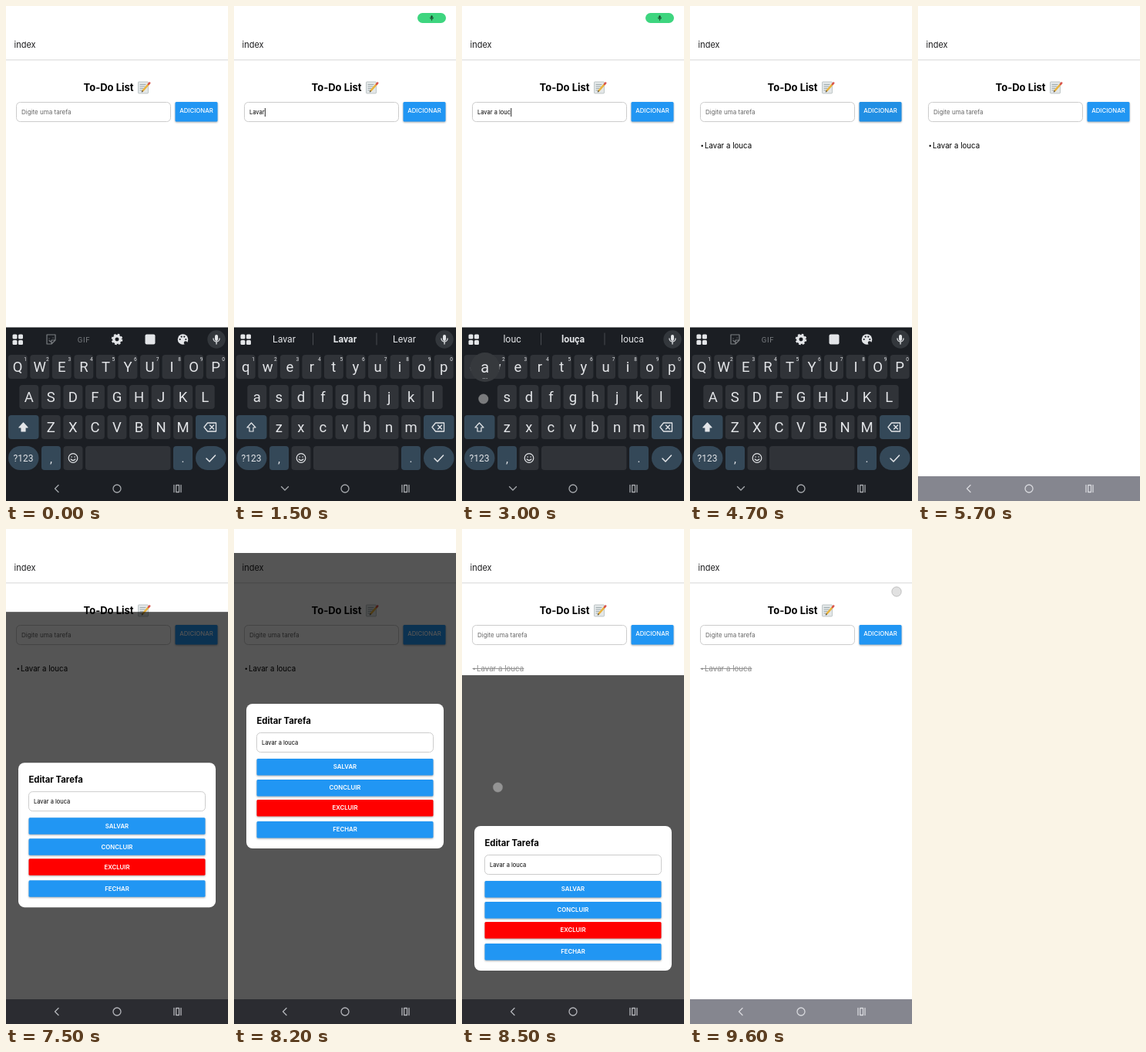
An HTML page that plays this animation: 288x640 px, repeating every 9.7 s.

```html
<!DOCTYPE html>
<html lang="pt">
<head>
<meta charset="utf-8">
<title>To-Do List</title>
<style>
  html, body { margin: 0; width: 100%; height: 100%; overflow: hidden; background: #fff; }
  svg { display: block; width: 288px; height: 640px; font-family: Inter, "Open Sans", sans-serif; }
  .kb { font-family: Roboto, "Noto Sans", sans-serif; fill: #e3e5e8; }
  .mid { text-anchor: middle; }
  .line { fill: none; stroke-linecap: round; stroke-linejoin: round; }
  .raised { filter: drop-shadow(0 1px 1px #0005); }
</style>
</head>
<body>
<svg id="stage" viewBox="0 0 288 640"></svg>
<script>
const LOOP = 9700, TASK = 'Lavar a louca';
const TYPE_START = 480, TYPE_STEP = 210, PRESS = 100;
const ADDED = 4450, HIDE_KEYS = 5450, OPEN = 7310, CLOSE = 8344, SLIDE = 300;
const BLUE = '#2196f3', KEY = '#303338', ACCENT = '#344858', BOARD = '#1b1e23', ICON = '#e3e5e8';

const rect = (x, y, w, h, r, fill, more = '') =>
  `<rect x="${x}" y="${y}" width="${w}" height="${h}" rx="${r}" fill="${fill}" ${more}/>`;
const circle = (x, y, r, more = '') => `<circle cx="${x}" cy="${y}" r="${r}" ${more}/>`;
const path = (d, stroke, width = 1.3, more = '') =>
  `<path class="line" d="${d}" stroke="${stroke}" stroke-width="${width}" ${more}/>`;
const text = (x, y, size, str, more = '') =>
  `<text x="${x}" y="${y}" font-size="${size}" ${more}>${str}</text>`;
const group = (id, body, more = '') => `<g id="${id}" ${more}>${body}</g>`;
const field = (x, y, w) => rect(x, y, w, 25, 5, '#fff', 'stroke="#ccc"');
const mic = (x, y, s, c) => `<g transform="translate(${x} ${y}) scale(${s})">` +
  rect(-2, -6, 4, 8, 2, c) + path('M-4 -1a4 4 0 0 0 8 0M0 3v3', c) + '</g>';

// Notepad with a pencil
const memo = rect(171.5, 98, 13, 15, 1, '#e3e7e8', 'stroke="#a9b3b5" stroke-width=".7"') +
  path('M174 101.5h7M174 104h6M174 106.5h4M174 109h3', '#8d9b9f', .8) +
  path('M177.5 109.5L185 101', '#e8b23c', 2.6) + path('M185 101l1.2-1.4', '#d9544d', 2.6) +
  path('M176.4 110.8l.8-.9', '#444', 1.2);

const page =
  rect(0, 0, 288, 640, 0, '#fff') +
  rect(0, 69, 288, 1, 0, '#e2e2e2') + rect(0, 70, 288, 1, 0, '#f3f3f3') +
  text(10.5, 54, 11, 'index', 'fill="#1c1c1e"') +
  text(100.5, 109.7, 13, 'To-Do List', 'font-weight="700"') + memo +
  field(13.5, 124.5, 200) +
  text(20, 140, 8, 'Digite uma tarefa', 'id="hint" fill="#666"') +
  text(20, 140, 7.5, '', 'id="typed"') +
  rect(63, 132, .9, 11, 0, '#111', 'id="caret"') +
  rect(219.5, 124, 55, 25.5, 1.5, BLUE, 'id="add" class="raised"') +
  text(247, 138.3, 7.8, 'ADICIONAR', 'class="mid" fill="#fff" font-weight="500"') +
  group('item', text(13.5, 183, 8, '•') + text(19, 183.5, 9.7, TASK) +
    path('M14 180.5H80', '#8a8a8a', .9, 'id="strike"'));

const chip = group('chip', rect(238, 9, 37, 13, 6.5, '#3ed57f') + mic(256.5, 15.5, .55, '#174328'));

// Modal at its resting place
const button = (y, label, fill = BLUE) =>
  rect(29.5, y, 229, 21.5, 1.5, fill, 'class="raised"') +
  text(144, y + 13.4, 7.8, label, 'class="mid" fill="#fff" font-weight="600"');
const modal = group('modal',
  rect(0, 31, 288, 577, 0, '#000', 'opacity=".667"') +
  rect(16, 226, 256, 187, 8, '#fff') +
  text(29.5, 252, 11.3, 'Editar Tarefa', 'font-weight="700"') +
  field(29.5, 263.5, 229) + text(36, 279, 7.5, TASK) +
  button(297, 'SALVAR') + button(324, 'CONCLUIR') +
  button(350, 'EXCLUIR', '#f00') + button(378, 'FECHAR'));

const keyAt = { ' ': [158, 585] };
const letterKeys = ['qwertyuiop', 'asdfghjkl', 'zxcvbnm'].map((row, r) => [...row].map((c, i) => {
  const x = [15.2, 29.8, 58.3][r] + 28.55 * i, y = [466.5, 505.5, 544.5][r];
  keyAt[c] = [x, y];
  return group('key-' + c,
    rect(x - 12.5, y - 15.5, 25, 31, 4, KEY) +
    text(x, y + 6.5, 18.5, c.toUpperCase(), 'class="mid letter"') +
    (r ? '' : text(x + 10, y - 7.5, 6.5, (i + 1) % 10, 'class="mid"')));
}).join('')).join('');

const gear = circle(144, 431, 4.2, `fill="none" stroke="${ICON}" stroke-width="3.4"`) +
  circle(144, 431, 6.3, `fill="none" stroke="${ICON}" stroke-width="2" stroke-dasharray="2.7 2.25"`);
const palette = circle(229.5, 431, 6.8) +
  [[-3.8, 0], [-1.8, -3.4], [1.8, -3.4], [3.8, 0]].map(([x, y]) =>
    circle(229.5 + x, 431 + y, 1.1, `fill="${BOARD}"`)).join('') +
  circle(233, 435.5, 2.2, `fill="${BOARD}"`);
const tools = group('tools',
  path('M53 425h11v7l-5 5h-6zM59 437v-5h5M56 430h.2M61 429h.2M56 432.5q2 2 3 1', '#7b7e82', 1.2) +
  text(101, 434.5, 9.5, 'GIF', 'class="mid" fill="#7b7e82" letter-spacing=".7"') +
  gear + rect(180.5, 424.5, 13, 13, 2, ICON) + palette);
const hints = group('hints', [65, 144, 221].map((x, i) =>
  text(x, 435, 12.3, '', `class="mid word" font-weight="${i == 1 ? 600 : 400}"`)).join('') +
  path('M102.5 423v15M185 423v15', '#484b50', 1));

const keyboard = group('keyboard',
  rect(0, 415.5, 288, 225, 0, BOARD) +
  [[8.5, 424.5], [16, 424.5], [8.5, 432], [16, 432]].map(([x, y]) => rect(x, y, 6, 6, 1.5, ICON)).join('') +
  tools + hints + circle(273, 431, 11.7, 'fill="#33373c"') + mic(273, 431, 1, ICON) +
  letterKeys +
  rect(3, 529, 39.5, 31, 4, ACCENT) +
  path('M22.5 539l5.5 6h-3v5h-5v-5h-3z', ICON, 1.2, 'id="shift"') +
  rect(246, 529, 39.5, 31, 4, ACCENT) +
  path('M257 544.5l4.5-5.5h11v11h-11zM264.5 542l5 5M269.5 542l-5 5', ICON) +
  rect(3, 569, 39.5, 31, 15.5, ACCENT) + text(22.5, 589, 12, '?123', 'class="mid"') +
  rect(46, 569, 25, 31, 4, ACCENT) + text(58.5, 591, 15, ',', 'class="mid"') +
  rect(74.5, 569, 25, 31, 4, KEY) +
  circle(87, 584.5, 5.8, `fill="none" stroke="${ICON}" stroke-width="1.2"`) +
  path('M85 583h.2M89 583h.2M84.2 586q2.8 3 5.6 0', ICON) +
  rect(103, 569, 110.5, 31, 4, KEY) +
  rect(217, 569, 25, 31, 4, ACCENT) + text(229.5, 590, 15, '.', 'class="mid"') +
  rect(246, 569, 39.5, 31, 15.5, ACCENT) + path('M260 585l4 4 7.5-8', ICON, 1.5) +
  group('popup', circle(0, 0, 19, 'fill="#36393d"') +
    text(0, 7, 20, '', 'id="popLetter" class="mid"') +
    text(0, 14.5, 9, '...', 'id="popMore" class="mid"')), 'class="kb"');

const nav = group('nav', rect(0, 608, 288, 32, 0, BOARD, 'id="navBack"') +
  path('', 'currentColor', 1.3, 'id="back"') +
  circle(144, 624, 5, 'fill="none" stroke="currentColor" stroke-width="1.3"') +
  path('M218 619.5v9M227 619.5v9M220.7 619.5h3.8v9h-3.8z', 'currentColor', 1.3));

const dot = circle(0, 0, 6.2, 'id="dot" fill="#c8c8c8" fill-opacity=".55" stroke="#888" stroke-opacity=".55" stroke-width=".8"');

const stage = document.getElementById('stage');
stage.innerHTML = page + chip + modal + keyboard + nav + dot;
const $ = id => document.getElementById(id);
const show = (id, on) => $(id).setAttribute('display', on ? 'inline' : 'none');
const move = (id, x, y) => $(id).setAttribute('transform', `translate(${x} ${y})`);
const put = (el, str) => { if (el.textContent !== str) el.textContent = str; };
const clamp = v => Math.max(0, Math.min(1, v));
const between = (t, a, b) => t >= a && t < b;

// Other touches: start, end, x, y
const taps = [
  [4300, 4500, 247, 138], [5300, 5450, 66, 624], [7130, 7270, 48, 180],
  [8230, 8580, 46.5, 334], [9500, LOOP, 268, 81]
];

function suggest(typed) {
  const word = typed.split(' ').pop();
  if (!word) return ['a', 'o', 'as'];
  if (word[0] == 'L') return [word, 'Lavar', 'Levar'];
  if (word[0] == 'a') return ['a', 'à', 'as'];
  return word == 'louca' ? ['louca', 'louça', 'loucas'] : [word, 'louça', 'louca'];
}

function drawInput(t) {
  const count = Math.floor((t - TYPE_START - PRESS) / TYPE_STEP) + 1;
  const typed = t < ADDED ? TASK.slice(0, Math.max(0, count)) : '';
  // A non-breaking space keeps the caret after a trailing blank
  put($('typed'), typed.replace(/ /g, '\u00a0'));
  show('hint', !typed);
  const typeEnd = TYPE_START + TYPE_STEP * (TASK.length - 1) + PRESS;
  const blink = t < typeEnd || Math.floor((t - typeEnd) / 500) % 2 == 0;
  show('caret', between(t, 100, HIDE_KEYS) && blink);
  $('caret').setAttribute('x', 20.3 + (typed ? $('typed').getComputedTextLength() : 0));
  $('add').setAttribute('fill', between(t, 4350, 4800) ? '#218fe4' : BLUE);
  return typed;
}

function drawKeyboard(t, typed) {
  const hide = clamp((t - HIDE_KEYS) / 250), caps = !typed;
  show('keyboard', hide < 1);
  move('keyboard', 0, 225 * hide * hide);
  show('tools', caps);
  show('hints', !caps);
  if (!caps) {
    const words = suggest(typed);
    document.querySelectorAll('.word').forEach((el, i) => put(el, words[i]));
  }
  const fit = c => caps ? c.toUpperCase() : c.toLowerCase();
  document.querySelectorAll('.letter').forEach(el => put(el, fit(el.textContent)));
  $('shift').style.fill = caps ? ICON : 'none';

  const since = t - TYPE_START, index = Math.floor(since / TYPE_STEP);
  const pressed = since >= 0 && since % TYPE_STEP < PRESS ? (TASK[index] || '').toLowerCase() : '';
  for (const c in keyAt) if (c != ' ') show('key-' + c, c != pressed);
  const letter = pressed.trim();
  show('popup', letter);
  if (letter) {
    const [x, y] = keyAt[letter];
    move('popup', x, y - 38.5);
    put($('popLetter'), fit(letter));
    show('popMore', 'aeiouc'.includes(letter));
  }
  return pressed && [keyAt[pressed][0] - 2, keyAt[pressed][1] + 2.5];
}

function drawModal(t) {
  const rise = clamp((t - OPEN) / SLIDE), fall = clamp((t - CLOSE) / SLIDE);
  show('modal', rise > 0 && fall < 1);
  move('modal', 0, 577 * ((1 - rise) ** 2 + fall ** 2));
  const done = t >= CLOSE;
  show('item', t >= ADDED);
  show('strike', done);
  $('item').setAttribute('fill', done ? '#8a8a8a' : '#000');
}

function drawNav(t) {
  const keys = t < HIDE_KEYS + 150, dim = between(t, OPEN - 60, CLOSE + SLIDE);
  $('navBack').setAttribute('fill', keys ? BOARD : dim ? '#2b2c31' : '#85868f');
  $('nav').setAttribute('color', keys ? '#a6a9ad' : dim ? '#b5b6bb' : '#d8d9de');
  $('back').setAttribute('d', between(t, 100, HIDE_KEYS + 150)
    ? 'M61.5 621.5l4.5 4.5 4.5-4.5' : 'M68 619.5l-4.5 4.5 4.5 4.5');
}

function draw(now) {
  const t = now % LOOP;
  const typed = drawInput(t);
  const touch = drawKeyboard(t, typed);
  drawModal(t);
  drawNav(t);
  $('chip').setAttribute('opacity', clamp((t - 800) / 200) * clamp((4400 - t) / 200));
  const tap = taps.find(([a, b]) => between(t, a, b));
  const at = touch || (tap && tap.slice(2));
  show('dot', at);
  if (at) move('dot', ...at);
  requestAnimationFrame(draw);
}
draw(performance.now());
</script>
</body>
</html>
```
